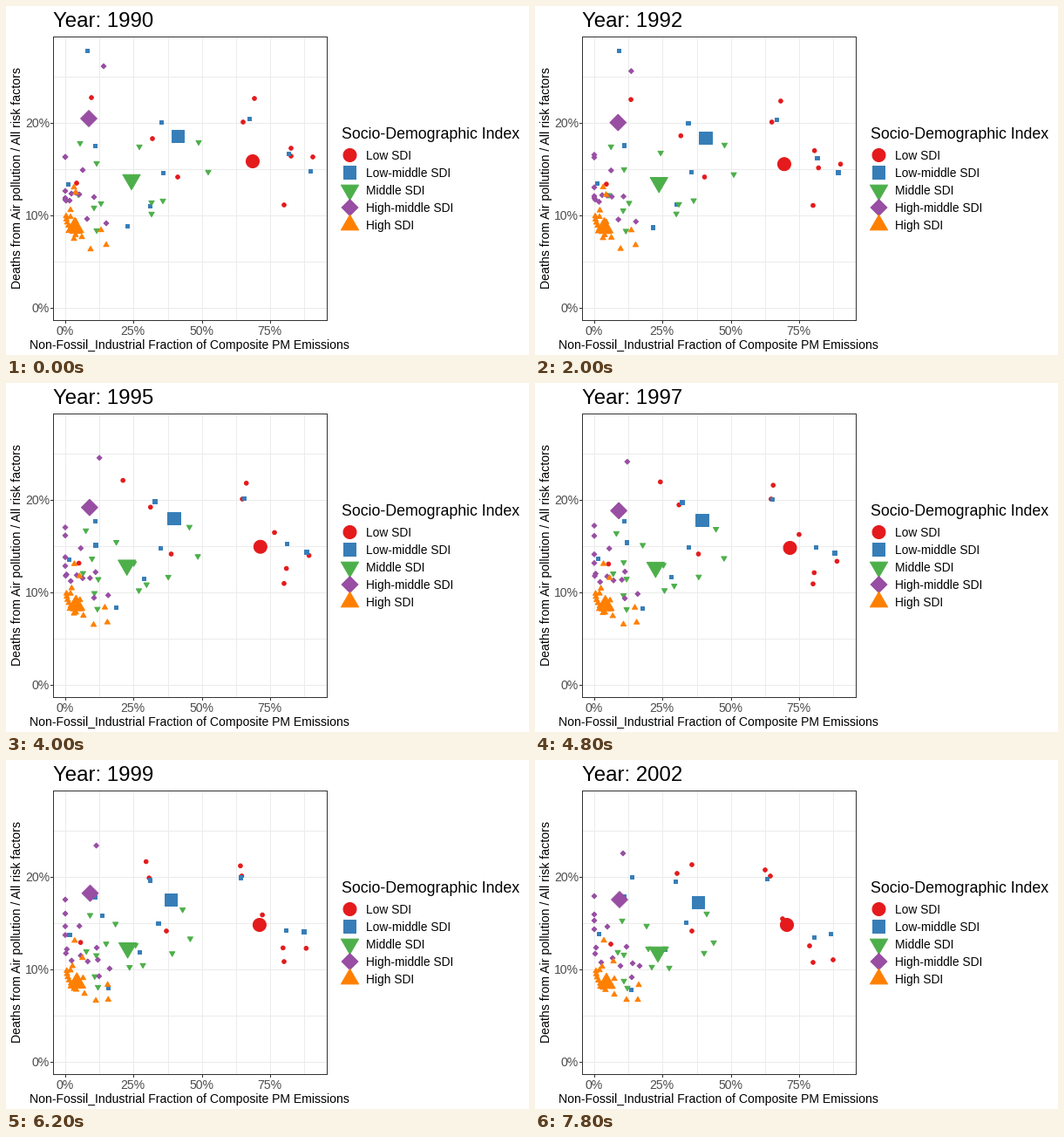
A matplotlib script for the animation above (8 s loop, 600 px wide and 400 px high).

```python
import numpy as np
import matplotlib
import matplotlib.pyplot as plt
from matplotlib.animation import FuncAnimation
from matplotlib.collections import PolyCollection

matplotlib.rcParams["font.family"] = "Liberation Sans"

W, H, DPI = 600, 400, 100
FRAMES, INTERVAL = 40, 200
HOLD = 5                    # still frames before the years start to run
LAST = FRAMES - 1 - HOLD
YEARS_PER_STEP = 27 / 74
PX = 72 / DPI               # one pixel in points
DARK, GREY, GRID = "#333333", "#4d4d4d", "#ebebeb"
SMALL, LARGE = 2.3, 7.5     # marker radii

# Marker outlines, y pointing down
turn = np.linspace(0, 2 * np.pi, 40, endpoint=False)
CIRCLE = np.column_stack([np.cos(turn), np.sin(turn)])
SQUARE = 0.95 * np.array([(-1, -1), (1, -1), (1, 1), (-1, 1)])
DIAMOND = 1.253 * np.array([(0, -1), (1, 0), (0, 1), (-1, 0)])
TRI_UP = np.array([(0, -1.166), (1.347, 1.166), (-1.347, 1.166)])
TRI_DOWN = TRI_UP * (1, -1)


def glide(*way):
    """Constant-speed legs of equal duration through x, y, x, y, ..."""
    xs, ys = way[::2], way[1::2]
    times = np.linspace(0, LAST, len(xs))
    return lambda s: (np.interp(s, times, xs), np.interp(s, times, ys))


def drift(x, y, dx, dy):
    return glide(x, y, x + dx, y + dy)


def ramp(s, start, end):
    return np.clip((s - start) / (end - start), 0, 1)


def plunge(s):
    """Holds near the top, drops sharply, then climbs again at the end."""
    x = 93 + 18 * ramp(s, 0, 28)
    y = 51 + 135 * ramp(s, 10, 14) - 10 * ramp(s, 14, 29) - 42 * ramp(s, 29, LAST)
    return x, y


low = [
    drift(98, 105, 82, 15), drift(168, 152, -5, -22), drift(81, 203, 6, 8),
    drift(197, 196, -17, 0), drift(272, 133, -2, 0), drift(285, 106, -21, 20),
    drift(327, 163, -43, 19), glide(327, 172, 321, 218, 315, 213),
    drift(352, 173, -10, 56), drift(319, 228, 0, 4),
]
low_mid = [
    drift(102, 160, 0, -4), drift(71, 204, 2, -5), drift(178, 133, -17, 6),
    drift(180, 191, -7, -5), drift(279, 129, -13, 7), drift(324, 169, -4, 34),
    drift(349, 189, -10, 10), drift(139, 252, -29, 11),
    drift(165, 229, -16, -12), plunge,
]
middle = [
    drift(85, 158, 15, 27), glide(104, 181, 98, 205, 130, 217),
    glide(153, 162, 123, 186, 128, 191), drift(221, 157, -24, 20),
    drift(232, 191, -27, 19), drift(180, 224, 14, -2),
    drift(167, 226, -13, 13), drift(167, 239, -33, -1),
    drift(109, 227, -7, -3), drift(101, 232, 1, 22),
    drift(104, 258, 2, 4), drift(83, 217, 12, 4), drift(144, 200, 6, 17),
]
high_mid = [
    drift(112, 69, -11, 38), drift(68, 173, 0, -17), drift(68, 173, 0, 4),
    drift(88, 188, -5, 3), drift(68, 212, 0, -28), drift(68, 222, 0, -28),
    drift(69, 223, 1, -8), drift(68, 220, 1, 2), drift(73, 223, 3, 9),
    drift(75, 215, 14, 12), drift(80, 214, 18, 22), drift(84, 216, 28, 17),
    drift(101, 219, 4, -5), drift(93, 244, 18, 5), drift(115, 249, 5, -13),
]
high = [
    drift(78, 207, 1, -1), drift(80, 213, 10, 17), drift(74, 233, 3, 3),
    drift(74, 241, 0, -1), drift(80, 246, 11, 4), drift(84, 258, 4, 1),
    drift(78, 266, 0, -6), drift(87, 264, 4, 4), drift(97, 278, 8, -4),
    drift(115, 273, 3, 1), drift(109, 256, 10, 1),
]
# dense arc hugging the left edge
high += [drift(69 + 0.3 * i * i, 240 + 3.6 * i, 1, 1) for i in range(7)]

# name, colour, marker, small points, group mean
GROUPS = [
    ("Low SDI", "#e41a1c", CIRCLE, low, glide(283, 178, 293, 189, 289, 189)),
    ("Low-middle SDI", "#377eb8", SQUARE, low_mid, drift(197, 149, -10, 14)),
    ("Middle SDI", "#4daf4a", TRI_DOWN, middle, glide(144, 202, 138, 213, 141, 223)),
    ("High-middle SDI", "#984ea3", DIAMOND, high_mid, drift(95, 129, 2, 31)),
    ("High SDI", "#ff7f00", TRI_UP, high, drift(79, 251, 3, 2)),
]

fig = plt.figure(figsize=(W / DPI, H / DPI), dpi=DPI, facecolor="white")
ax = fig.add_axes([0, 0, 1, 1])
ax.set_xlim(0, W)
ax.set_ylim(H, 0)
ax.axis("off")


def line(xs, ys, color):
    ax.plot(xs, ys, color=color, lw=PX, antialiased=False,
            solid_capstyle="projecting", zorder=1)


def label(x, y, s, size, color="black", **kw):
    return ax.text(x, y, s, fontsize=size * PX, color=color, va="baseline",
                   zorder=2, **kw)


def markers(color, zorder):
    coll = PolyCollection([], facecolor=color, edgecolor=color, lw=PX,
                          zorder=zorder)
    ax.add_collection(coll, autolim=False)
    return coll


# Panel
L, R, T, B = 54, 368, 35, 360
for i in range(8):
    x = round(68 + 39.2 * i)
    line((x, x), (T, B), GRID)
for i in range(6):
    y = 346 - 53 * i
    line((L, R), (y, y), GRID)
line((L, R, R, L, L), (T, T, B, B, T), DARK)
for i in range(4):
    x = round(68 + 78.4 * i)
    line((x, x), (B + 1, B + 3), DARK)
    label(x - 0.5, 377, f"{25 * i}%", 14, GREY, ha="center")
for i in range(3):
    y = 346 - 106 * i
    line((L - 3, L - 1), (y, y), DARK)
    label(50, y + 5, f"{10 * i}%", 14, GREY, ha="right")

title = label(54, 24, "", 24)
label(210.5, 393, "Non-Fossil_Industrial Fraction of Composite PM Emissions", 14,
      ha="center")
label(17.5, 197.5, "Deaths from Air pollution / All risk factors", 14.15,
      rotation=90, rotation_mode="anchor", ha="center")

# Legend
label(385, 152, "Socio-Demographic Index", 17.7)
for i, (name, color, shape, _, _) in enumerate(GROUPS):
    # triangles hang from their centroid
    dy = 2.9 * ((shape is TRI_DOWN) - (shape is TRI_UP))
    markers(color, 3).set_verts([shape * LARGE + (394, 170.5 + 20 * i + dy)])
    label(413, 176.5 + 19.8 * i, name, 13.8)

clouds = [markers(group[1], 4 + i) for i, group in enumerate(GROUPS)]


def draw(frame):
    step = max(0, frame - HOLD)
    title.set_text(f"Year: {round(1990 + step * YEARS_PER_STEP)}")
    for cloud, (_, _, shape, points, mean) in zip(clouds, GROUPS):
        verts = [shape * SMALL + p(step) for p in points]
        cloud.set_verts(verts + [shape * LARGE + mean(step)])
    return [title, *clouds]


anim = FuncAnimation(fig, draw, frames=FRAMES, interval=INTERVAL,
                     repeat=True, repeat_delay=0, blit=False)
plt.show()
```
